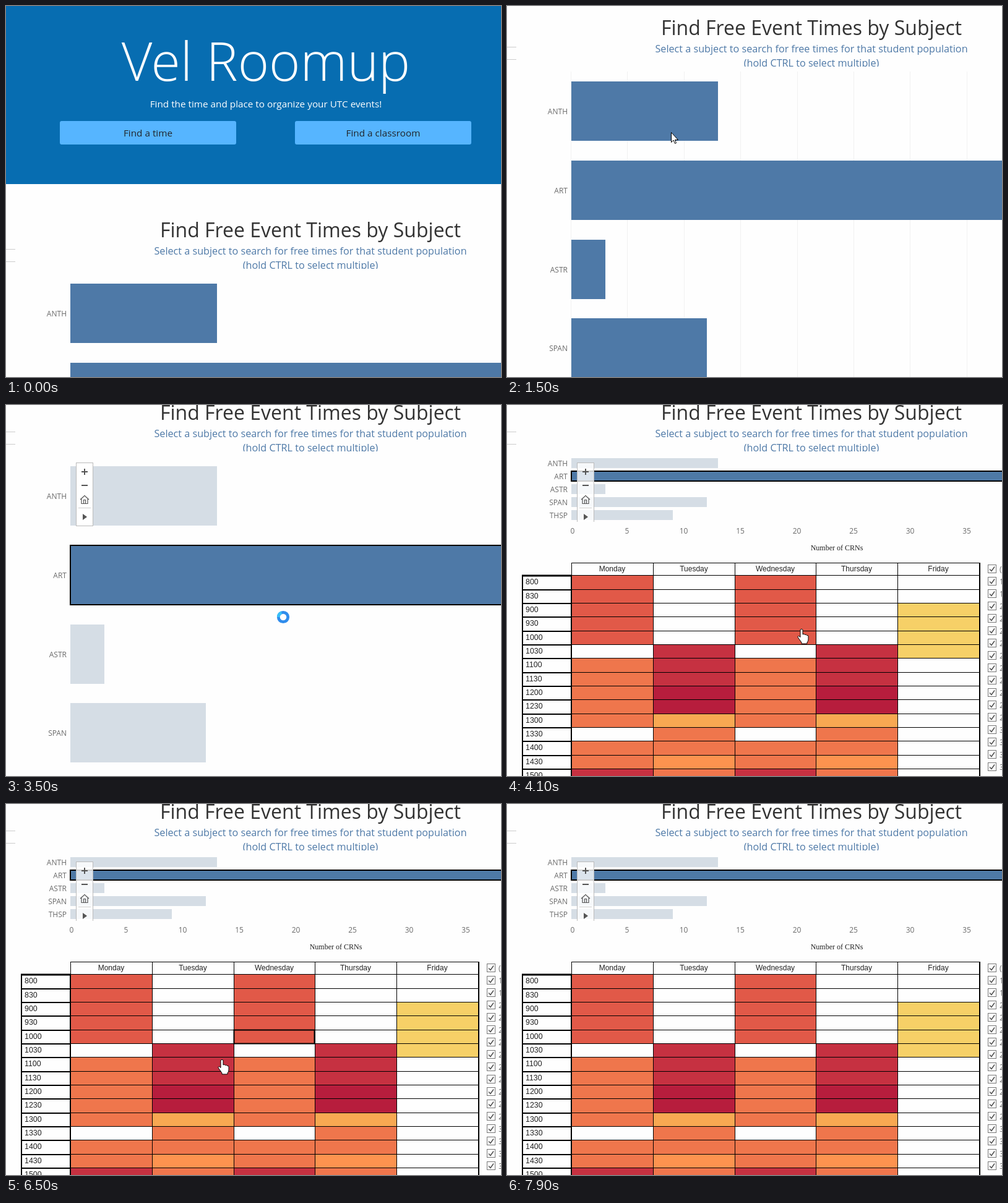
Animation, 800 px wide and 600 px high, one loop 8000 ms. Source, as an HTML page:

```html
<!DOCTYPE html>
<html lang="en">
<head>
<meta charset="utf-8">
<title>Event time finder</title>
<style>
html, body { margin: 0; width: 100%; height: 100%; overflow: hidden; background: #fefefe; }
svg { display: block; width: 800px; height: 600px; font-family: "Open Sans", "Noto Sans", sans-serif; }
.mid { text-anchor: middle; }
.end { text-anchor: end; }
.brand { font-size: 86px; font-weight: 300; fill: #fff; }
.lead, .btn text { font-size: 15.3px; }
.lead { fill: #fff; }
.btn rect { fill: #56b5ff; }
.btn text { fill: #212529; }
.btn.hover rect { fill: #33a6ff; }
.btn.hover text { fill: #e4f3ff; }
.title { font-size: 32px; fill: #333; }
.sub { font-size: 16.2px; fill: #4e79a7; }
.label { font-size: 12px; fill: #6b6b6b; }
.bar { fill: #4e79a7; }
.picked .bar, .dim { fill: #d5dde5; }
.picked .bar.art { fill: #4e79a7; stroke: #000; stroke-width: 2; }
.grid { stroke: #f1f1f1; }
.cells { stroke: #000; }
.cells text { stroke: none; fill: #222; font: 12px "Liberation Sans", Arial, sans-serif; }
.cells .slot { font-size: 12.4px; }
.check { fill: #fff; stroke: #777; }
.tick { fill: none; stroke: #555; stroke-width: 1.6; }
.tools path { fill: none; stroke: #555; }
.tip text { font-size: 13px; fill: #787878; }
.tip .act { font-size: 12px; font-weight: 600; fill: #666; }
.tip .val { fill: #222; }
.pointer { fill: #fff; stroke: #000; stroke-linejoin: round; }
</style>
</head>
<body>
<svg id="stage" viewBox="0 0 800 600"></svg>
<script>
const range = n => [...Array(n).keys()];
const rect = (x, y, w, h, attrs = "") => `<rect x="${x}" y="${y}" width="${w}" height="${h}" ${attrs}/>`;
const text = (x, y, s, cls) => `<text x="${x}" y="${y}" class="${cls}">${s}</text>`;
const path = (d, attrs = "") => `<path d="${d}" ${attrs}/>`;
const group = (id, body, attrs = "") => `<g id="${id}" ${attrs}>${body}</g>`;

const subjects = [["ANTH", 13], ["ART", 45], ["ASTR", 3], ["SPAN", 12], ["THSP", 9]];
const barWidth = n => Math.round(n * 18.25);
const colX = [104, 236, 368, 499, 631, 763];
const rowY = i => Math.round(275.2 + 22.35 * i);
const tones = { r: "#e15948", o: "#ef764c", c: "#c63141", b: "#b71d3d", a: "#f8a852", f: "#fd934f", y: "#f6d067", ".": "#fefefe" };
const early = "rrrrr.ooooo.ooc", late = ".....cccbbaoofo", friday = "..yyyy.........";
const days = [["Monday", early], ["Tuesday", late], ["Wednesday", early], ["Thursday", late], ["Friday", friday]];

const button = (id, x, label) => group(id,
  rect(x, 186, 285, 38, 'rx="3"') + text(x + 142.5, 211, label, "mid"), 'class="btn"');

function hero() {
  return rect(0, 0, 800, 288, 'fill="#076db1"') +
    text(420, 121, "Vel Roomup", "brand mid") +
    text(420, 164, "Find the time and place to organize your UTC events!", "lead mid") +
    button("timeBtn", 87, "Find a time") + button("roomBtn", 467, "Find a classroom");
}

function heading() {
  return text(492, 374, "Find Free Event Times by Subject", "title mid") +
    text(492, 402, "Select a subject to search for free times for that student population", "sub mid") +
    text(492, 425, "(hold CTRL to select multiple)", "sub mid") +
    rect(200, 425, 600, 12, 'fill="#fefefe"') +
    path("M0 393.5H15M0 413.5H15", 'stroke="#ccc"');
}

function tallChart() {
  const lines = range(8).map(k => `M${Math.round(103 + 91.4 * k) + .5} 433V1000`).join("");
  const bars = subjects.map(([name, n], i) => {
    const y = Math.round(449 + 127.8 * i);
    return rect(104, y, barWidth(n), 96, `class="bar ${name.toLowerCase()}"`) + text(98, y + 53, name, "label end");
  }).join("");
  return path(lines, 'id="gridLines" class="grid"') + bars;
}

function flatChart() {
  const bars = subjects.map(([name, n], i) => {
    const y = 86 + 21 * i, art = name === "ART";
    return rect(104, y, barWidth(n), 16, art ? 'fill="#4e79a7" stroke="#000" stroke-width="2"' : 'class="dim"') +
      text(98, y + 12.5, name, "label end");
  }).join("");
  const axis = range(8).map(k => text(k ? 102.5 + 91.5 * k : 106, 208, 5 * k, "label mid")).join("");
  return bars + axis + `<text x="533" y="235" class="mid" fill="#222" style="font:12px 'Liberation Serif',Times,serif">Number of CRNs</text>`;
}

function timetable() {
  let out = "";
  days.forEach(([day, codes], c) => {
    const x = colX[c], w = colX[c + 1] - x;
    [...codes].forEach((k, r) => {
      out += rect(x + .5, rowY(r) + .5, w, rowY(r + 1) - rowY(r), `fill="${tones[k]}"`);
    });
    out += rect(x + .5, 255.5, w, 20, 'fill="#fefefe"') + text(x + w / 2, 269, day, "mid");
  });
  range(15).forEach(r => {
    const minutes = 480 + 30 * r;
    out += path(`M24 ${rowY(r) + 1}H104`, `stroke-width="${r ? 2 : 3}"`) +
      text(30, rowY(r) + 15, Math.floor(minutes / 60) * 100 + minutes % 60, "slot");
  });
  return out + path("M25 275V600M104 275V600M764 255V600", 'stroke-width="2"');
}

const filters = () => [..."(112222222222" + "3333"].map((s, i) => {
  const y = 258.5 + 20 * i;
  return rect(777.5, y, 13, 13, 'class="check"') + path(`M780 ${y + 7}l3 3 5-7`, 'class="tick"') +
    text(796, y + 11, s, "label");
}).join("");

function toolbar(height, alpha) {
  return rect(113.5, 93.5, 27, height, `fill="#fff" fill-opacity="${alpha}" stroke="#bbb"`) +
    path("M122 108H132M127 103V113M122 130H132", 'style="stroke-width:2"') +
    path("M120 153L127 146.5 134 153M122 152V159.5H132V152M125.5 159V153.5H128.5V159", 'style="stroke-width:1.2"') +
    path("M117 166.5H137", 'style="stroke:#ccc"') +
    path("M124 176L131 181 124 186Z", 'style="fill:#555;stroke:none"');
}

function tooltip(id, x, y, height, facts) {
  const rows = ["Timeslot:", "Day:", "Number of Classes:"]
    .map((s, i) => text(13, 116 + 18 * i, s, "") + text(133, 116 + 18 * i, facts[i], "val")).join("");
  const dots = range(4).map(i => `M184 ${10.5 + 2.5 * i}h12`).join("");
  const body = rect(2, 2, 309, height, 'fill="#000" opacity=".18"') +
    rect(.5, .5, 308, height - 1, 'fill="#fefefe" stroke="#ccc"') +
    path("M16 15l3 4 6-9", 'class="tick"') + text(34, 18, "Keep Only", "act") +
    '<circle cx="112" cy="14" r="5" fill="none" stroke="#666" stroke-width="1.2"/>' +
    path("M108.5 17.5l7-7", 'stroke="#666"') + text(125, 18, "Exclude", "act") +
    path(dots, 'stroke="#666" stroke-width="1.3" stroke-dasharray="2 1"');
  return group(id, body + group(id + "Facts", rows), `class="tip" transform="translate(${x} ${y})"`);
}

const outline = (id, c, r) => rect(colX[c] + .5, rowY(r) + .5, colX[c + 1] - colX[c] - 1, rowY(r + 1) - rowY(r),
  `id="${id}" fill="none" stroke="#000" stroke-width="2"`);

const cursors =
  path("M.5 .5V16.5L4 13 6.5 18.5 8.5 17.5 6.5 12.5H11.5Z", 'id="arrow" class="pointer"') +
  path("M-2 1.5Q0-1 2 1.5V9Q4 7.5 5.5 9.5 7.5 8.5 8.5 10.5 11 10 11 12V17Q11 20 9 22V24H0V22L-5 15Q-7 12-4.5 11.5L-2 13.5Z", 'id="hand" class="pointer"') +
  group("ring", '<circle r="7.7" fill="#fefefe" stroke="#2f8cec" stroke-width="4.8"/>' +
    path("M-7.7 0A7.7 7.7 0 0 1-2.5-7.3", 'fill="none" stroke="#38c0f8" stroke-width="4.8"'));

document.getElementById("stage").innerHTML =
  group("page", heading() + group("tall", tallChart()) + hero()) +
  group("flat", flatChart() + group("table", timetable(), 'class="cells"') + filters()) +
  group("tools", toolbar(102, 1), 'class="tools"') +
  `<clipPath id="frame">${rect(100, 80, 60, 109)}</clipPath>` +
  group("toolsCut", toolbar(102, .8), 'class="tools" clip-path="url(#frame)"') +
  outline("thuCell", 3, 6) + outline("wedCell", 2, 4) + outline("tueCell", 1, 7) +
  tooltip("wedTip", 447, 386, 169, [1000, "Wednesday", 7]) +
  tooltip("wedTipTall", 447, 386, 240, ["", "", ""]) +
  tooltip("tueTip", 330, 447, 240, [1130, "Tuesday", 8]) +
  group("cursor", cursors);

const part = {};
document.querySelectorAll("[id]").forEach(e => part[e.id] = e);
const show = (id, on) => part[id].style.display = on ? "" : "none";
show("wedTipTallFacts", false);

// time, x, y of the pointer
const track = [
  [300, 693, 480], [500, 480, 69], [700, 29, 120], [900, 265, 204], [1500, 265, 204], [2000, 400, 318],
  [2800, 400, 318], [3000, 439, 328], [3300, 439, 328], [3400, 447, 342], [3500, 448, 343], [4000, 448, 343],
  [4400, 560, 418], [4500, 560, 418], [4800, 431, 370], [6400, 431, 370], [6500, 349, 413], [6600, 313, 431],
  [7600, 313, 431], [7700, 500, 405], [7800, 780, 400], [8000, 780, 400]
];
const scrolls = [[0, 0], [1200, 94], [1300, 117], [1500, 327], [1600, 350]];

function pointerAt(t) {
  const i = Math.max(1, track.findIndex(k => k[0] >= t));
  const [t0, x0, y0] = track[i - 1], [t1, x1, y1] = track[i];
  const p = (t - t0) / (t1 - t0);
  return [x0 + (x1 - x0) * p, y0 + (y1 - y0) * p].map(Math.round);
}

function draw(now) {
  const t = Math.floor(now % 8000 / 100) * 100;
  const during = (a, b) => t >= a && t < b;
  const scroll = scrolls.filter(s => s[0] <= t).pop()[1];
  part.page.setAttribute("transform", `translate(0 ${-scroll})`);
  part.timeBtn.classList.toggle("hover", during(800, 1300));
  part.tall.classList.toggle("picked", t >= 2200);
  show("gridLines", during(1500, 1700));
  show("tall", t < 3800);
  show("flat", t >= 3800);
  show("tools", during(2600, 3800));
  show("toolsCut", t >= 3800);
  show("thuCell", during(4400, 4700));
  show("wedCell", during(4800, 6600));
  show("tueCell", during(6600, 7700));
  show("wedTip", during(5000, 5800));
  show("wedTipTall", during(5800, 6500));
  show("tueTip", during(6800, 7700));
  show("tueTipFacts", t < 7400);

  const [x, y] = pointerAt(t);
  const ring = during(3400, 3900);
  const hand = during(800, 1200) || during(1800, 3400) || during(3900, 7800);
  show("cursor", during(300, 7900));
  show("ring", ring);
  show("hand", hand);
  show("arrow", !ring && !hand);
  part.cursor.setAttribute("transform", `translate(${x} ${y})`);
}

function tick() {
  draw(performance.now());
  requestAnimationFrame(tick);
}
tick();
</script>
</body>
</html>
```
